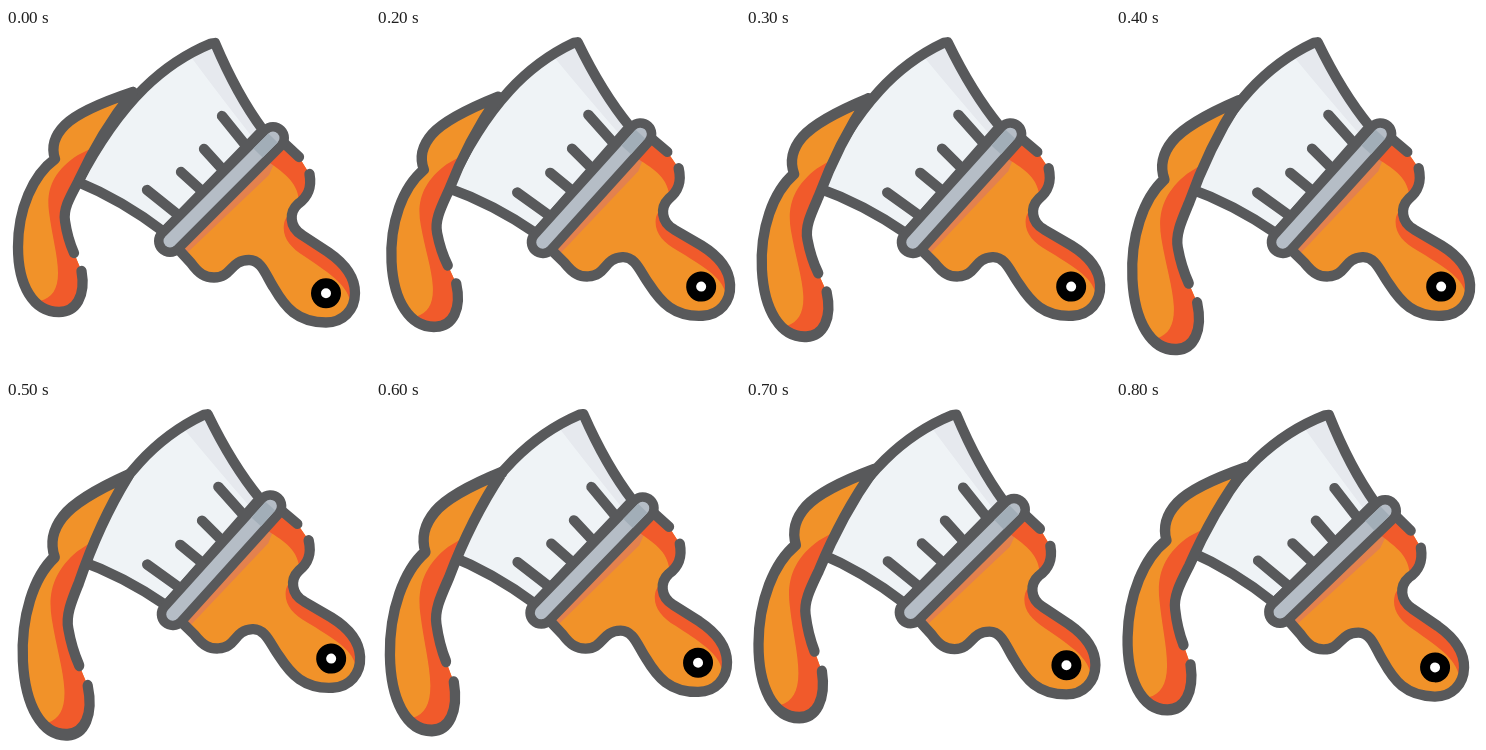
Recreate the animation shown at these times as an HTML page with a canvas. Size 364 px wide and 344 px high, loop 0.9 s.

```html
<!DOCTYPE html>
<html lang="en">
<head>
<meta charset="utf-8">
<title>Paint brush</title>
<style>
  html, body { margin: 0; width: 100%; height: 100%; overflow: hidden; background: #fff; }
  canvas { display: block; width: 364px; height: 344px; }
</style>
</head>
<body>
<canvas id="stage"></canvas>
<script>
const W = 364, H = 344, LOOP = 900;
const INK = '#58595b', ORANGE = '#f19229', RED = '#f15a2b';
const canvas = document.getElementById('stage');
const ctx = canvas.getContext('2d');
const dpr = window.devicePixelRatio || 1;
canvas.width = W * dpr;
canvas.height = H * dpr;

// Each pose: tilt in degrees, shift x, shift y, drip stretch
const poses = [
  [0, 0, 0, 1],
  [-2.9, 0, 0, 1.03],
  [-2.9, 0, 0, 1.067],
  [-2.9, 0, 0, 1.115],
  [-2.9, 0, 0, 1.164],
  [-0.85, 0.5, -0.6, 1.168],
  [0.2, 0.8, -0.5, 1.129],
  [1.1, 1.1, -0.4, 1.108]
];
const PIVOT = [190, 160], DRIP_TOP = 16;

const dripOuter = 'M127 64C100 73 72 84 59 97C48 108 45 119 49 131' +
  'C27 147 12 181 12 219C12 257 27 284 53 284C70 284 80 268 75.5 243';
const dripInner = 'M68 225C64 216 61 207 59 193C57 181 64 169 72 154';
const bristleEdge = 'Q95 104 127 64';
const handleOuter = 'M174 223L185 235C193 246 199 249.5 208 249.5C226 249.5 224 232 243 232' +
  'C256 232 260 248 268 260C279 279 291 294.5 320 294.5C337 294.5 349 282 349 265' +
  'C349 249 338 235 322 224L296 207C283 199 283 184 292 176C302 169 306 160 303.5 146';

const path = d => new Path2D(d);
const shapes = {
  dripBody: path(dripOuter + 'L68 225' + dripInner.slice(7) + bristleEdge + 'Z'),
  dripShade: path('M90 118L72 127C47 143 40 162 43 184C46 208 52 228 52 245' +
    'C52 261 46 270 34 273L40 292H90V120Z'),
  dripLines: path(dripOuter + dripInner + bristleEdge),
  handleBody: path(handleOuter + 'L293 129L280 116Z'),
  handleShade: path('M264 135L282 116L320 130V176H293C293 155 279 146 264 135Z' +
    'M290 180L360 240V270L344 273C341 256 320 243 298 228C284 219 276 209 278 196C279 189 284 185 290 180Z'),
  handleStrip: path('M174 226H180L263 147L268 136L262 130Z'),
  handleLines: path(handleOuter + 'M278 115L293 129'),
  bristles: path('M205 15.5C160 34 116 70 72 154Q116 172 158 204L257 102Q231 67 209 15Z'),
  bristleShade: path('M209 10L185 29Q214 68 250 114L262 104Z'),
  hairs: path('M216 88L241 119M198 121L218 143M175 144L196 163M141 162L171 186'),
  ferrule: path('M164 213L267 110'),
  ferruleEnd: path('M252 125L267 110')
};

function fill(shape, color) {
  ctx.fillStyle = color;
  ctx.fill(shape);
}

function stroke(shape, width = 10.3, color = INK) {
  ctx.lineWidth = width;
  ctx.strokeStyle = color;
  ctx.stroke(shape);
}

function fillInside(body, color, ...shades) {
  fill(body, color);
  ctx.save();
  ctx.clip(body);
  for (const [shape, tone] of shades) fill(shape, tone);
  ctx.restore();
}

function drawDrip(stretch) {
  ctx.save();
  ctx.translate(0, DRIP_TOP);
  ctx.scale(1, stretch);
  ctx.translate(0, -DRIP_TOP);
  fillInside(shapes.dripBody, ORANGE, [shapes.dripShade, RED]);
  stroke(shapes.dripLines);
  ctx.restore();
}

function drawBrush() {
  fillInside(shapes.handleBody, ORANGE,
    [shapes.handleStrip, '#e3814e'], [shapes.handleShade, RED]);
  stroke(shapes.handleLines);

  fillInside(shapes.bristles, '#eff3f6', [shapes.bristleShade, '#e6e9ee']);
  stroke(shapes.bristles);
  stroke(shapes.hairs);

  stroke(shapes.ferrule, 32);
  stroke(shapes.ferrule, 13, '#b5bdc6');
  ctx.lineCap = 'butt';
  stroke(shapes.ferruleEnd, 13, '#a2aeb8');
  ctx.lineCap = 'round';

  ctx.beginPath();
  ctx.arc(320, 265.3, 10, 0, Math.PI * 2);
  ctx.fillStyle = '#fff';
  ctx.fill();
  ctx.lineWidth = 10;
  ctx.strokeStyle = '#000';
  ctx.stroke();
}

function draw(time) {
  const step = Math.max(0, Math.floor((time % LOOP) / 100) - 1);
  const [tilt, dx, dy, stretch] = poses[step];
  ctx.setTransform(dpr, 0, 0, dpr, 0, 0);
  ctx.fillStyle = '#fff';
  ctx.fillRect(0, 0, W, H);
  ctx.lineCap = ctx.lineJoin = 'round';
  ctx.translate(PIVOT[0] + dx, PIVOT[1] + dy);
  ctx.rotate(tilt * Math.PI / 180);
  ctx.translate(-PIVOT[0], -PIVOT[1]);
  drawBrush();
  drawDrip(stretch);
}

let start;
function tick(now) {
  start ??= now;
  draw(now - start);
  requestAnimationFrame(tick);
}
draw(0);
requestAnimationFrame(tick);
</script>
</body>
</html>
```
